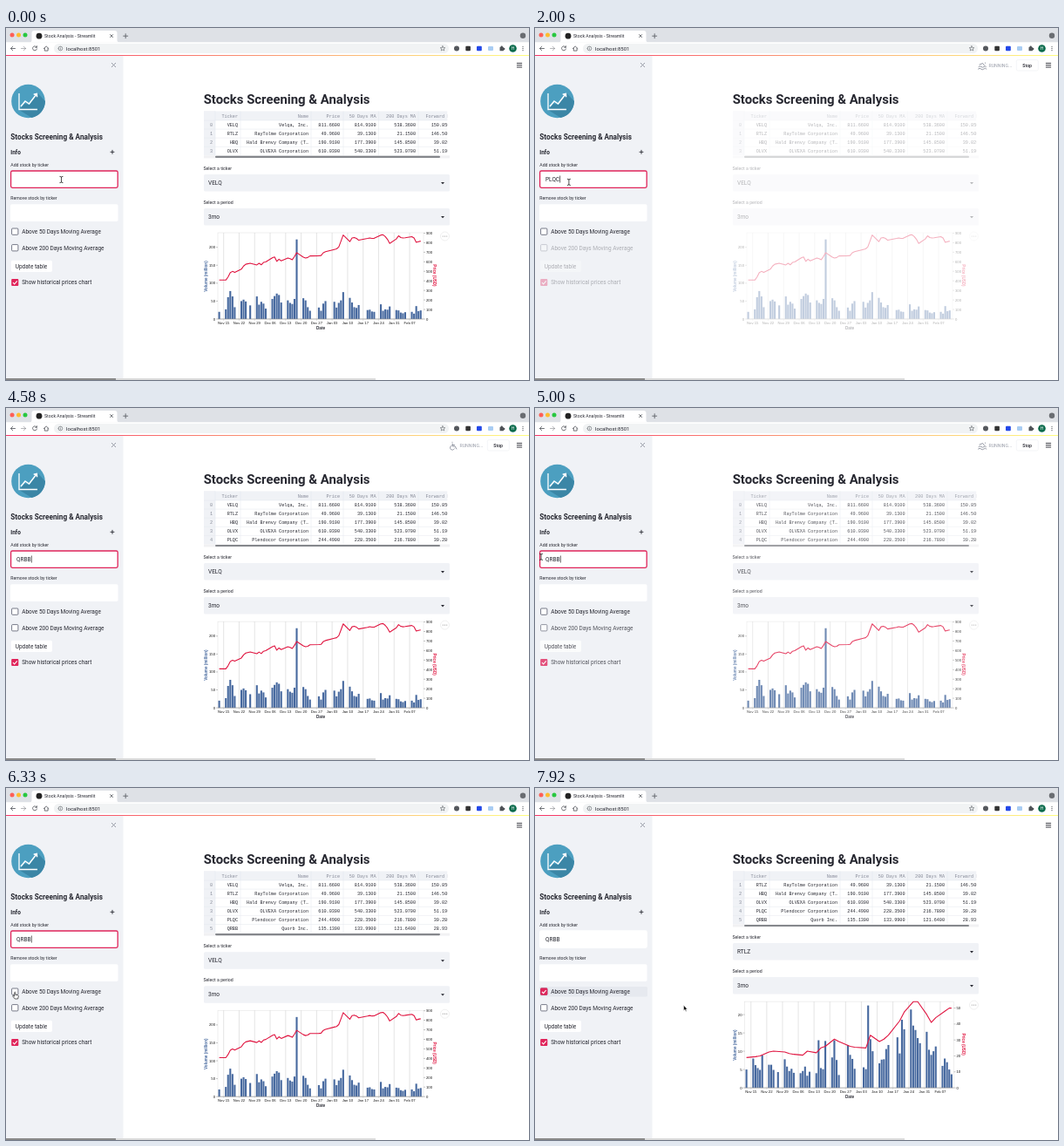
Write an HTML page that moves like this. It is 600 px wide and 404 px high and loops after 8 s.

```html
<!DOCTYPE html>
<html lang="en">
<head>
<meta charset="utf-8">
<title>Stock Analysis</title>
<style>
  html, body { margin: 0; width: 100%; height: 100%; overflow: hidden; background: #fff; }
  svg { display: block; width: 100vw; height: 100vh; }
  text { font-family: Roboto, sans-serif; font-size: 6.5px; fill: #262730; white-space: pre; }
  .small { font-size: 5.2px; }
  .bold { font-weight: 700; }
  .mono { font-family: "Liberation Mono", monospace; font-size: 5.15px; }
  .dim { fill: #858997; }
  .axis { font-family: "Liberation Sans", sans-serif; font-size: 4.2px; fill: #111; }
  .axisTitle { font-family: "Liberation Sans", sans-serif; font-size: 4.6px; font-weight: 700; }
  .end { text-anchor: end; }
  .mid { text-anchor: middle; }
  .line { fill: none; stroke: #5f6368; stroke-width: .9; stroke-linecap: round; stroke-linejoin: round; }
</style>
</head>
<body>
<svg id="stage" viewBox="0 0 600 404" preserveAspectRatio="none"></svg>
<script>
const LOOP = 8000;
const RED = '#e0245a', BLUE = '#47699f', GREY = '#f0f2f6';
const $ = id => document.getElementById(id);
const clamp = v => Math.max(0, Math.min(1, v));

const text = (x, y, s, cls = '', extra = '') =>
  `<text x="${x}" y="${y}" class="${cls}" ${extra}>${s}</text>`;
const rect = (x, y, w, h, fill, extra = '') =>
  `<rect x="${x}" y="${y}" width="${w}" height="${h}" fill="${fill}" ${extra}/>`;
const dot = (x, y, r, fill, extra = '') =>
  `<circle cx="${x}" cy="${y}" r="${r}" fill="${fill}" ${extra}/>`;
const path = (d, extra = 'class="line"') => `<path d="${d}" ${extra}/>`;
const group = (id, body, extra = '') => `<g id="${id}" ${extra}>${body}</g>`;

/* ---------- data ---------- */
const STOCKS = [
  ['VELQ', 'Velqa, Inc.', '811.6600', '814.9100', '538.3600', '150.8500'],
  ['RTLZ', 'RayTolme Corporation', '49.9600', '39.1300', '21.1500', '146.5000'],
  ['HBQ', 'Hald Brenvy Company (T…', '190.9100', '177.3900', '145.8500', '39.0200'],
  ['OLVX', 'OLVEXA Corporation', '610.0300', '540.3300', '523.0700', '51.1900'],
  ['PLQC', 'Plendocor Corporation', '244.4900', '228.3500', '216.7800', '30.2800'],
  ['QRBB', 'Quorb Inc.', '135.1300', '133.9900', '121.6400', '28.9300']
];
const HEADS = ['Ticker', 'Name', 'Price', '50 Days MA', '200 Days MA', 'Forward PE'];
const COLS = [266, 347, 383, 424.5, 470, 512.4];

const HOLIDAYS = [13, 42, 49, 66];
const days = [...Array(92).keys()].filter(d => (d + 4) % 7 < 5 && !HOLIDAYS.includes(d));
const WEEKS = ['Nov 15', 'Nov 22', 'Nov 29', 'Dec 06', 'Dec 13', 'Dec 20', 'Dec 27',
  'Jan 03', 'Jan 10', 'Jan 17', 'Jan 24', 'Jan 31', 'Feb 07'];

const FIRST = {
  x0: 244.6, step: 2.54, left: 243, right: 479, vUnit: .4115, vStep: 50, pUnit: .1095, pStep: 100, every: 1,
  volume: [20, 27, 61, 78, 63, 33, 50, 54, 49, 38, 63, 40, 48, 43, 29, 56, 64, 71, 67, 46, 52, 45, 42, 56, 222,
    58, 52, 33, 23, 32, 23, 43, 50, 48, 32, 45, 52, 75, 59, 46, 33, 31, 39, 25, 26, 21, 20, 41, 23, 27, 26, 35,
    25, 24, 18, 16, 19, 20, 15, 36, 22, 24],
  price: [408, 408, 441, 486, 499, 489, 522, 555, 574, 585, 567, 584, 568, 593, 599, 641, 650, 604, 627, 610,
    640, 633, 622, 655, 695, 649, 640, 645, 661, 663, 665, 694, 705, 729, 735, 755, 816, 880, 811, 849, 854, 845,
    826, 844, 850, 845, 846, 880, 883, 864, 835, 793, 839, 872, 854, 849, 852, 863, 849, 804, 811, 816]
};
const SECOND = {
  x0: 242.6, step: 2.585, left: 240.5, right: 480.5, vUnit: 4.2, vStep: 5, pUnit: 1.83, pStep: 10, every: 2,
  volume: [5, 8, 6.2, 5.4, 4.9, 8.9, 6.3, 6.3, 4.9, 4.3, 7.8, 5.8, 4.6, 5.2, 4.1, 4, 4.6, 5.8, 3.3, 4.4, 4, 13, 5.4,
    5.1, 12.8, 8.3, 13, 7.6, 3.5, 11.7, 9, 7.9, 5.2, 5.6, 5.1, 22.5, 13.3, 10, 6.7, 7.7, 7.8, 10.6, 11.7, 13.8,
    9.4, 18.6, 16, 21.4, 17, 15.8, 13.6, 12.2, 15.3, 10.4, 9, 10, 11.3, 6, 8, 7, 5, 3.7],
  price: [19, 19.5, 20, 22.5, 23, 22.5, 21.5, 21, 20.5, 23, 22, 25, 26, 30.5, 29, 26, 25.5, 25, 33, 29, 30.5, 33,
    42, 47.5, 54, 54, 46, 41, 44, 48, 50, 50]
};

/* ---------- pieces ---------- */
function chart(id, c) {
  const TOP = 235, BASE = 334;
  const dayX = d => c.x0 + c.step * d;
  let s = rect(c.left, TOP, c.right - c.left, BASE - TOP, 'none', 'stroke="#ddd" stroke-width=".5"');
  WEEKS.forEach((name, i) => {
    const x = dayX(2 + 7 * i);
    s += path(`M${x} ${TOP}V${BASE + 2}`, 'stroke="#d2d2d2" stroke-width=".6"') + text(x, 339.8, name, 'axis mid');
  });
  const ticks = (x, unit, step, cls, dx) => {
    for (let v = 0; v * unit <= BASE - TOP; v += step) {
      const y = BASE - v * unit;
      s += path(`M${x} ${y}h${dx}`, 'stroke="#888" stroke-width=".5"') + text(x + dx * 1.5, y + 1.5, v, cls);
    }
  };
  ticks(c.left, c.vUnit, c.vStep, 'axis end', -2);
  ticks(c.right, c.pUnit, c.pStep, 'axis', 2);
  c.volume.forEach((v, i) => {
    s += rect(dayX(days[i]) - 1.05, BASE - v * c.vUnit, 2.1, v * c.vUnit, BLUE);
  });
  const pts = c.price.map((p, i) => `${dayX(days[Math.min(i * c.every, 61)])},${BASE - p * c.pUnit}`);
  s += `<polyline points="${pts.join(' ')}" fill="none" stroke="#e01540" stroke-width="1.1" stroke-linejoin="round"/>`;
  s += path(`M${c.left} ${BASE}H${c.right}`, 'stroke="#888" stroke-width=".6"');
  s += text(361, 346, 'Date', 'axisTitle mid');
  s += text(0, 0, 'Volume (million)', 'axisTitle mid', `fill="${BLUE}" style="fill:${BLUE}" transform="translate(231 285) rotate(-90)"`);
  s += text(0, 0, 'Price (USD)', 'axisTitle mid', 'style="fill:#e01540" transform="translate(489.5 284) rotate(90)"');
  return group(id, s);
}

function table(from, to) {
  const n = to - from, bottom = 106 + 10.1 * n;
  let s = rect(227, 95.5, 282, 10.5, GREY) + rect(227, 95.5, 13, bottom - 95.5, GREY);
  for (const x of [240, 269, 350, 387, 427.5, 473])
    s += path(`M${x} 95.5V${bottom}`, 'stroke="#e3e6ec" stroke-width=".5"');
  HEADS.forEach((h, i) => s += text(COLS[i], 102.7, h, 'mono end dim'));
  for (let r = 0; r < n; r++) {
    const y = 112.9 + 10.1 * r;
    s += path(`M227 ${y - 6.9}H509`, 'stroke="#e3e6ec" stroke-width=".5"');
    s += text(235.5, y, from + r, 'mono mid dim');
    STOCKS[from + r].forEach((v, i) => s += text(COLS[i], y, v, 'mono end'));
  }
  return `<g clip-path="url(#cut)">${s}</g>` + rect(227, bottom, 282, 3, '#f1f1f3') + rect(240, bottom + .4, 258, 2.2, '#85878c', 'rx="1.1"');
}

function select(y, label, id, value) {
  return text(226.5, y - 5, label, 'small') + rect(227, y, 282, 19.5, GREY, 'rx="1.5"') +
    text(232, y + 12.2, value, '', `id="${id}"`) + path(`M499 ${y + 9}h4l-2 2.3z`, 'fill="#262730"');
}

const box = y => rect(6.6, y, 7.3, 7.3, '#fff', 'rx="1" stroke="#55586a" stroke-width=".8"');
const ticked = y => rect(6.2, y - .4, 8.1, 8.1, RED, 'rx="1"') +
  path(`M8 ${y + 3.8}l1.7 1.8 3-3.6`, 'fill="none" stroke="#fff" stroke-width="1.1"');

function browser() {
  let s = rect(0, 0, 600, 16.5, '#dee1e6');
  ['#ff5f57', '#febc2e', '#28c840'].forEach((c, i) => s += dot(7 + 7.5 * i, 8, 2.5, c));
  s += path('M27 16.5q2.5 0 2.5-3V6q0-3 3-3h92q3 0 3 3v7.5q0 3 2.5 3z', 'fill="#fff"');
  s += dot(38, 9.2, 3.4, '#222') + text(44, 11.2, 'Stock Analysis - Streamlit', 'small');
  s += path('M119.6 7.6l3 3m0-3l-3 3M134.7 9.2h5m-2.5-2.5v5') + dot(593, 8.8, 3.2, '#6a6d72');
  s += rect(0, 16.5, 600, 15, '#fff') + rect(55, 18, 453, 11, '#f1f3f4', 'rx="5.5"');
  s += path('M10.5 23.5h-5m2.2-2.3l-2.3 2.3 2.3 2.3');
  s += path('M17.5 23.5h5m-2.2-2.3l2.3 2.3-2.3 2.3', 'class="line" opacity=".5"');
  s += path('M35.2 22a2.5 2.5 0 1 0 .3 2M35.4 20.7v1.6h-1.6');
  s += path('M43.4 23.6l2.8-2.6 2.8 2.6M44.3 23.3v2.8h3.8v-2.8');
  s += path('M60 23.5a2.4 2.4 0 1 0 4.8 0a2.4 2.4 0 1 0-4.8 0M62.4 23.3v1.3M62.4 22v.1', 'class="line" style="stroke-width:.6"');
  s += text(69, 25.7, 'localhost:8501', '', 'style="font-size:6px"');
  s += path('M501 20.7l.8 1.9 2 .1-1.6 1.3.6 2-1.8-1.1-1.8 1.1.6-2-1.6-1.3 2-.1z', 'class="line" style="stroke-width:.6"');
  s += dot(517, 23.5, 3, '#55585d') + rect(527.3, 20.7, 5.6, 5.6, '#333', 'rx="1"');
  s += rect(540, 20.7, 5.8, 5.6, '#2348e8', 'rx="1"') + rect(553, 21, 6, 5, '#a9cdf3', 'rx="1"');
  s += rect(566.5, 22, 4.4, 4.3, '#4d5156', 'rx=".5"') + dot(568.7, 21.6, 1.2, '#4d5156') + dot(571.2, 24, 1.2, '#4d5156');
  s += dot(581.5, 23.5, 4.3, '#0b6b4c') + text(581.5, 25.3, 'H', 'small mid', 'style="fill:#fff"');
  for (const y of [21.3, 23.5, 25.7]) s += dot(593, y, .65, '#5f6368');
  return s;
}

function sidebar() {
  let s = rect(0, 31.5, 134.5, 373, GREY) + path('M121.3 40.3l4.4 4.4m0-4.4l-4.4 4.4', 'class="line" style="stroke:#8b8f9b"');
  s += dot(25.5, 84, 19.3, '#4c9fc0');
  s += path('M36 74.5l9 9.5a19.3 19.3 0 0 1-15.5 18.9L15 94l6-7 6 1z', 'fill="#3b86a6"');
  s += path('M15 75v18.5h21', 'fill="none" stroke="#fff" stroke-width="1.3"');
  s += path('M17 90l5-6 4.5 3 8.5-11M31.7 76.3l3.7-.8.2 3.8', 'fill="none" stroke="#fff" stroke-width="1.5"');
  s += text(5.3, 127.7, 'Stocks Screening &amp; Analysis', 'bold', 'style="font-size:8.25px"');
  s += text(5.3, 144.6, 'Info', 'bold') + path('M120 142.3h4m-2-2v4', 'class="line" style="stroke:#262730"');
  s += text(5.3, 158.7, 'Add stock by ticker', 'small');
  s += rect(5.6, 164, 122.6, 19.3, '#fff', 'id="field" rx="1.8" stroke-width="1.3"');
  s += rect(11.5, 168.8, 0, 9.6, '#aed4fb', 'id="mark"') + text(12, 176.1, '', '', 'id="typed"');
  s += rect(12, 169.5, .7, 8, '#222', 'id="caret"');
  s += text(5.3, 197.2, 'Remove stock by ticker', 'small') + rect(5, 202.3, 123.5, 19.7, '#fff', 'rx="1.8"');
  s += rect(5, 228, 124, 11.5, '#e6e9ef', 'id="hover" rx="1.5"');
  s += box(230) + group('check50', ticked(230)) + text(18.2, 235.9, 'Above 50 Days Moving Average');
  s += group('sideStale', box(248.6) + text(18.2, 254.6, 'Above 200 Days Moving Average') +
    rect(5.8, 266.8, 47.2, 13.2, '#fff', 'rx="1.8"') + text(10.7, 275.7, 'Update table') +
    ticked(288.4) + text(18.2, 294.3, 'Show historical prices chart'));
  return s;
}

const SPORTS = [
  'M508.5 47q1.6-1.6 3.2 0t3.2 0 3 0M509 44.5q1.5-1.4 3 0t3 0 2.5 0M510 42l3.6-1.5 2 2.6M516.5 40v.3',
  'M512 39.2v.2M512.2 41v3h3l1.6 3M511 43.2a2.6 2.6 0 1 0 3.4 3.6M512.2 42.4h2.4',
  'M508.2 45.5a2 2 0 1 0 4 0a2 2 0 1 0-4 0M513.8 45.5a2 2 0 1 0 4 0a2 2 0 1 0-4 0M510.2 45.5l1.6-3.4 2.4 1.2-1 2.4M512 42l2.2-2 2 2M514.6 38.4v.2'
];
function status() {
  return path('', 'id="sport" class="line" style="stroke:#8b8f9b"') +
    text(520.5, 45, 'RUNNING...', 'small', 'style="fill:#9a9eaa"') +
    rect(552.3, 36.6, 25, 12.4, '#fff', 'rx="1.8" stroke="#eceef2" stroke-width=".6"') +
    text(564.7, 44.6, 'Stop', 'small mid', 'font-weight="500"');
}

const POINTERS = {
  beam: path('M-1.6-3.6Q0-3.6 0-2.6Q0-3.6 1.6-3.6M0-2.8V2.8M-1.6 3.6Q0 3.6 0 2.6Q0 3.6 1.6 3.6', 'class="line" style="stroke:#222;stroke-width:.8"'),
  hand: path('M-.8-3.4q.8-.8 1.2 0v2.6l2.8.6q.8.3.6 1.4l-.7 2.8h-3.4l-2.5-3q0-1 1-.7l1 .8z', 'fill="#fff" stroke="#222" stroke-width=".7"'),
  arrow: path('M0-2.7V3.6L1.5 2.2 2.5 4.5 3.5 4 2.5 1.9H4.4z', 'fill="#111" stroke="#fff" stroke-width=".5"')
};

$('stage').innerHTML =
  `<defs><clipPath id="cut"><rect x="227" y="95" width="279.3" height="80"/></clipPath>
   <linearGradient id="band"><stop stop-color="#f63366"/><stop offset="1" stop-color="#fffd80"/></linearGradient></defs>` +
  rect(0, 0, 600, 404, '#fff') + browser() + sidebar() + rect(0, 31, 600, 1, 'url(#band)') +
  group('status', status()) +
  path('M586.3 40.4h5.4m-5.4 2.3h5.4m-5.4 2.3h5.4', 'class="line" style="stroke:#262730"') +
  text(226.7, 87, 'Stocks Screening &amp; Analysis', 'bold', 'style="font-size:14.9px"') +
  group('table', '') +
  group('below',
    group('selects', select(168, 'Select a ticker', 'chosen', '') + select(207, 'Select a period', 'period', '3mo')) +
    group('charts', chart('chartA', FIRST) + chart('chartB', SECOND) +
      dot(503.5, 239, 5, '#fff', 'stroke="#e4e4e4" stroke-width=".6"') +
      [501.3, 503.5, 505.7].map(x => dot(x, 239, .6, '#999')).join(''))) +
  rect(0, 402, 424, 2, '#dcdcdc') + rect(0, 402, 126, 2, '#8a8a8a') +
  Object.keys(POINTERS).map(k => group(k, POINTERS[k])).join('');

/* ---------- timeline ---------- */
const RUNS = [
  { on: 1050, side: 2200, table: 2350, chart: 2650 },
  { on: 4400, side: 5200, table: 5350, chart: 5800 },
  { on: 6600, side: 6950, table: 7100, chart: 7450 }
];
const CLICK = 6480;
const WORDS = [
  { s: STOCKS[4][0], keys: [300, 450, 600, 750] },
  { s: STOCKS[5][0], keys: [3600, 3800, 4000, 4150] }
];
const MOUSE = [[0, 63.5, 174], [1200, 63.5, 174], [1900, 39, 177], [2400, 38, 176], [2700, 32, 173], [3200, 6.5, 170],
  [4900, 6.5, 170], [5450, 12, 180], [5700, 12, 182], [6250, 10.5, 238], [6750, 10.5, 238], [7400, 170.5, 252]];

const show = (id, on) => $(id).style.display = on ? '' : 'none';

function mouseAt(t) {
  const i = MOUSE.findIndex(m => m[0] > t);
  if (i < 0) return MOUSE[MOUSE.length - 1].slice(1);
  const [a, b] = [MOUSE[i - 1], MOUSE[i]];
  const k = (t - a[0]) / (b[0] - a[0]), e = k * k * (3 - 2 * k);
  return [a[1] + (b[1] - a[1]) * e, a[2] + (b[2] - a[2]) * e];
}

let shown = '';
function render(t) {
  const run = RUNS.find(r => t >= r.on && t < r.chart);
  const fade = part => run && t < run[part] ? 1 - .67 * clamp((t - run.on - 450) / 450) : 1;
  $('sideStale').style.opacity = fade('side');
  $('table').style.opacity = $('selects').style.opacity = fade('table');
  $('charts').style.opacity = fade('chart');
  show('status', run);
  $('sport').setAttribute('d', SPORTS[(Math.floor(t / 250) + 1) % 3]);

  const done = RUNS.filter(r => t >= r.table).length;
  const from = done === 3 ? 1 : 0, to = Math.min(6, 4 + done);
  if (shown !== from + '-' + to) {
    shown = from + '-' + to;
    $('table').innerHTML = table(from, to);
    $('chosen').textContent = STOCKS[from][0];
    $('below').setAttribute('transform', `translate(0 ${(to - from - 4) * 10.1})`);
  }
  const second = t >= RUNS[2].chart;
  show('chartA', !second);
  show('chartB', second);

  const word = WORDS[t < WORDS[1].keys[0] ? 0 : 1];
  $('typed').textContent = word.s.slice(0, word.keys.filter(k => t >= k).length);
  const width = $('typed').getComputedTextLength();
  const [mx, my] = mouseAt(t);
  const marking = t >= 2700 && t < WORDS[1].keys[0];
  const edge = Math.max(12, Math.min(12 + width, mx));
  $('mark').setAttribute('x', edge - .4);
  $('mark').setAttribute('width', marking ? 12.4 + width - edge : 0);
  const focused = t < CLICK;
  const typing = t > 3600 && t < 4650;
  $('caret').setAttribute('x', 12.3 + width);
  show('caret', focused && !marking && t > 200 && (typing || t % 1000 < 500));
  $('field').setAttribute('stroke', focused ? RED : '#fff');
  show('check50', !focused);
  show('hover', !focused);

  const hidden = t > 300 && t < 1200 || t > 3600 && t < 4900;
  const kind = mx < 128 && (my < 184 || my > 202 && my < 222) ? 'beam' : mx < 115 && my > 227 ? 'hand' : 'arrow';
  for (const k in POINTERS) {
    show(k, !hidden && k === kind);
    $(k).setAttribute('transform', `translate(${mx} ${my})`);
  }
}

function tick() {
  render(performance.now() % LOOP);
  requestAnimationFrame(tick);
}
tick();
</script>
</body>
</html>
```
